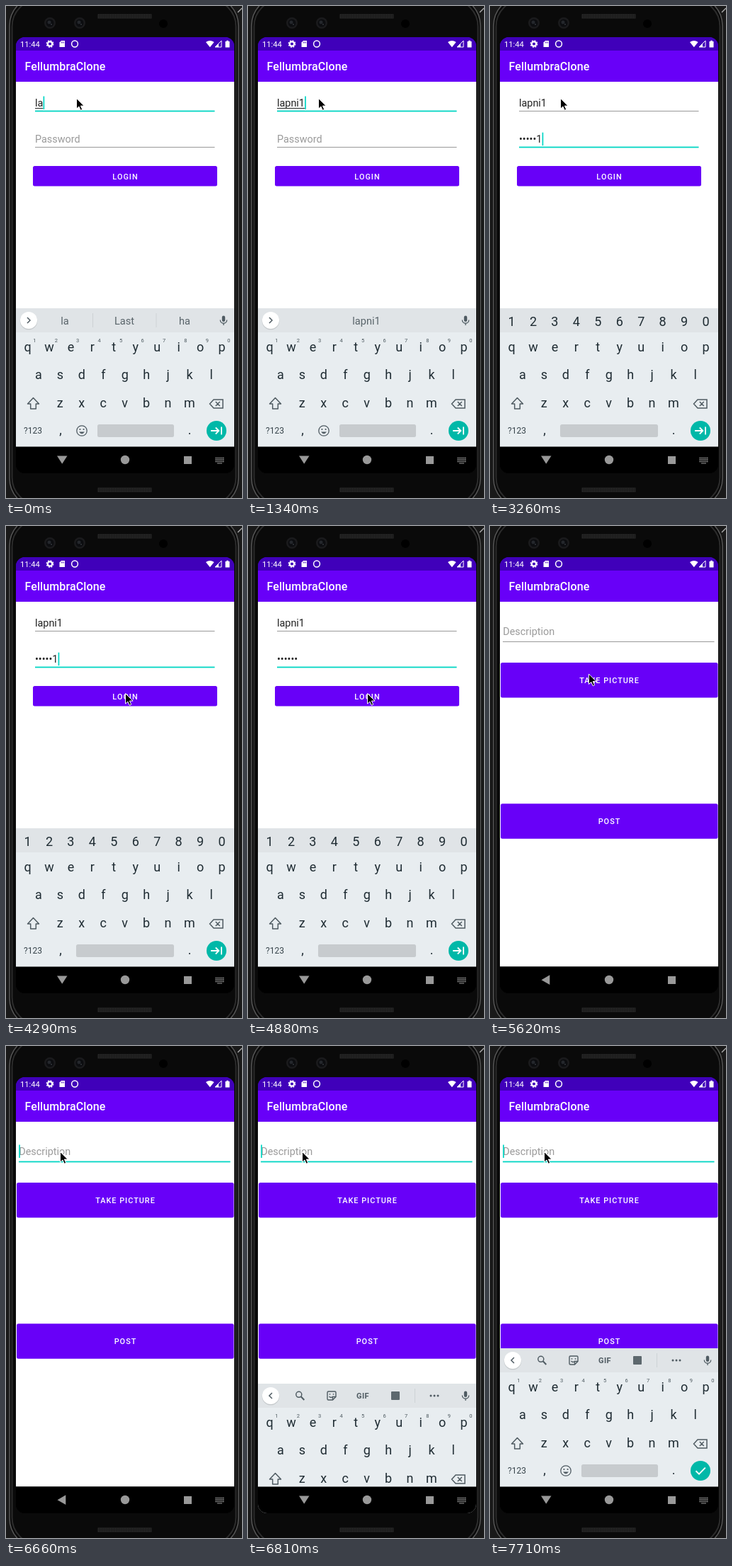
These frames come from a looping animation (333 by 695 pixels, 8000 ms). An HTML page:

```html
<!DOCTYPE html>
<html lang="en">
<head>
<meta charset="utf-8">
<title>Phone login</title>
<style>
  html, body { margin: 0; width: 100%; height: 100%; overflow: hidden; background: #161616; }
  svg { display: block; width: 333px; height: 695px; font-family: Roboto, "Open Sans", sans-serif; }
  text { white-space: pre; }
  .mid { text-anchor: middle; }
  .field { font-size: 14.4px; fill: #222; }
  .hint { font-size: 14.4px; fill: #9a9a9a; }
  .caps { font-size: 10.9px; font-weight: 500; letter-spacing: 1px; fill: #fff; text-anchor: middle; }
  .key { font-size: 18px; fill: #1f2c33; text-anchor: middle; }
  .sup { font-size: 7.5px; fill: #4c585e; text-anchor: middle; }
  .sug { font-size: 14.6px; fill: #59646a; text-anchor: middle; }
  .line { fill: none; stroke: #4f5b62; stroke-width: 1.5; }
</style>
</head>
<body>
<svg id="stage" viewBox="0 0 333 695"></svg>
<script>
const LOOP = 8000, STEP = 148.15;
const PURPLE = '#6800f8', DARK = '#4000ba', TEAL = '#00d5c4', GREY = '#999';
const PITCH = 30.45;

const rect = (x, y, w, h, fill, extra = '') =>
  `<rect x="${x}" y="${y}" width="${w}" height="${h}" fill="${fill}" ${extra}/>`;
const circle = (x, y, r, fill, extra = '') =>
  `<circle cx="${x}" cy="${y}" r="${r}" fill="${fill}" ${extra}/>`;
const path = (d, extra) => `<path d="${d}" ${extra}/>`;
const text = (x, y, s, cls, extra = '') =>
  `<text x="${x}" y="${y}" class="${cls}" ${extra}>${s}</text>`;
const group = (id, body, extra = '') => `<g id="${id}" ${extra}>${body}</g>`;
const row = (chars, x, y, cls) =>
  [...chars].map((c, i) => text(x + i * PITCH, y, c, cls)).join('');
const title = text(26.5, 91, 'FellumbraClone', '',
  'font-size="16" font-weight="500" letter-spacing=".1" fill="#fff"');

function speaker(y) {
  const dots = [1.5, 3.5, 5.5].map(d =>
    path(`M130 ${y + d}H205`, 'stroke="#343434" stroke-width="1" stroke-dasharray="1.2 1.2"')).join('');
  return rect(129, y, 77, 7, '#191919', 'rx="1.5"') + dots;
}

function phone() {
  const lens = x => circle(x, 24, 8, '#1b1b1d') + circle(x, 24, 5.5, '#0c0d10') +
    circle(x - 1, 23, 2.5, '#24272c') + circle(x + 2, 26, 1, '#33373d');
  return rect(0, 0, 333, 695, '#191919') +
    rect(5, -14, 323, 723, '#090909', 'rx="42" stroke="#565656" stroke-width="1.5"') +
    rect(8.5, -9, 316, 713, '#0a0a0a', 'rx="38" stroke="#2c2c2c" stroke-width="2"') +
    speaker(11) + speaker(680) + lens(62) + lens(104) +
    circle(222, 25, 6, '#000') +
    path('M327 9L333 3', 'stroke="#aaa" stroke-width="1.5"');
}

function statusBar() {
  const gear = circle(62, 53.5, 3.2, 'none', 'stroke="#fff" stroke-width="2.2"') +
    circle(62, 53.5, 4.7, 'none', 'stroke="#fff" stroke-width="1.4" stroke-dasharray="2 1.69"');
  return rect(14, 44, 308, 19, DARK) +
    text(20, 57.7, '11:44', '', 'font-size="11.2" fill="#fff"') + gear +
    path('M78 49H83V58H75.5V51.5Z', 'fill="#fff"') +
    path('M78.2 50.5V52.5M79.8 50.5V52.5M81.4 50.5V52.5', `stroke="${DARK}" stroke-width=".8"`) +
    circle(97, 53.5, 4.4, 'none', 'stroke="#fff" stroke-width="1.5"') +
    path('M282 51Q287.8 46.8 293.6 51L287.8 58.3Z', 'fill="#fff"') +
    path('M304 49V58H295Z', 'fill="none" stroke="#fff"') +
    path('M300 53.5V58H295Z', 'fill="#fff"') +
    path('M309.5 50H311.2V48.8H313.8V50H315.5V58.5H309.5Z', 'fill="#fff"');
}

const header = rect(14, 44, 308, 19, DARK) + rect(14, 63, 308, 44, PURPLE) + title;

function loginPage() {
  return rect(14, 63, 308, 560, '#fff') + header +
    text(41, 142, '', 'field', 'id="user"') + rect(41, 144, 0, 1, '#222', 'id="compose"') +
    rect(41, 0, 253.5, 1, GREY, 'id="userLine"') +
    text(41, 193, 'Password', 'hint', 'id="passHint"') +
    text(41, 193, '', 'field', 'id="pass"') +
    rect(41, 0, 253.5, 1, GREY, 'id="passLine"') +
    rect(0, 127.5, 1.7, 18.5, TEAL, 'id="caret"') +
    rect(39, 230, 258, 30, '#000', 'id="shade" rx="4" opacity=".2" filter="url(#soft)"') +
    rect(38, 226, 260, 28.5, PURPLE, 'rx="2.5"') +
    rect(38, 226, 260, 28.5, '#fff', 'rx="2.5" id="ripple"') +
    text(168.5, 244.5, 'LOGIN', 'caps');
}

function postPage() {
  const button = (y, label) => rect(15, y, 306.5, 49.5, PURPLE, 'rx="2.5"') +
    text(168.5, y + 28.8, label, 'caps');
  return rect(14, 63, 308, 560, '#fff') + header +
    text(18.3, 154, 'Description', 'hint') +
    rect(18, 0, 298.5, 1, GREY, 'id="descLine"') +
    rect(18.2, 139.5, 1.7, 18.5, TEAL, 'id="descCaret"') +
    button(193, 'TAKE PICTURE') + button(392.3, 'POST');
}

function keyboard() {
  const disc = d => circle(32, 445, 12.3, '#000', 'opacity=".12"') + circle(32, 444, 12, '#fff') +
    path(d, 'class="line" stroke-width="1.8"');
  const mic = rect(304.8, 437.5, 4.4, 8.5, '#4f5b62', 'rx="2.2"') +
    path('M302.3 443.5A4.7 4.7 0 0 0 311.7 443.5M307 448.3V451', 'class="line" style="stroke-width:1.3"');
  const words = disc('M30 440L34 444L30 448') + mic +
    group('bars', rect(122, 434, 1, 20, '#cdd2d5') + rect(211.5, 434, 1, 20, '#cdd2d5')) +
    [83, 167, 252].map((x, i) => text(x, 450, '', 'sug', `id="word${i}"`)).join('');
  const tools = disc('M34 440L30 444L34 448') + mic +
    circle(71.8, 442.3, 4, 'none', 'class="line"') + path('M74.8 445.3L79.3 450', 'class="line" style="stroke-width:2"') +
    path('M113.5 438H122.5Q124 438 124 439.5V445.5L119.5 450H113.5Q112 450 112 448.5V439.5Q112 438 113.5 438ZM124 445.5H119.5V450M114.5 445Q117 448 120 445', 'class="line" style="stroke-width:1.4"') +
    circle(115.5, 441.8, .9, '#4f5b62') + circle(120.5, 441.8, .9, '#4f5b62') +
    text(162, 448, 'GIF', 'mid', 'font-size="11" font-weight="700" letter-spacing=".4" fill="#4f5b62"') +
    rect(202, 438, 12, 12, '#5d686e', 'rx="1"') +
    rect(235, 434, 1, 20, '#cdd2d5') +
    [258, 263, 268].map(x => circle(x, 444, 1.5, '#4f5b62')).join('');
  const smile = circle(107, 600, 7.2, 'none', 'class="line" style="stroke-width:1.3"') +
    circle(104.4, 598, 1.1, '#4f5b62') + circle(109.6, 598, 1.1, '#4f5b62') +
    path('M103 601.5Q107 607 111 601.5Z', 'fill="#4f5b62"');
  return group('kbBack', rect(14, 427, 308, 196, '#e8edf0') + rect(14, 427, 308, 34, '#e0e4e7')) +
    group('words', words) + group('tools', tools) +
    group('digits', row('1234567890', 30.5, 451.5, 'key')) +
    row('qwertyuiop', 30.5, 487.5, 'key') +
    group('sups', row('1234567890', 40.3, 475, 'sup')) +
    row('asdfghjkl', 46, 527, 'key') + row('zxcvbnm', 76.3, 567, 'key') +
    path('M38.5 553.5L46.5 562H42.3V569H34.7V562H30.5Z', 'class="line" stroke-linejoin="round"') +
    path('M293 556H306V568H293L287.5 562ZM295.8 559L301.8 565M301.8 559L295.8 565', 'class="line"') +
    text(38, 604, '?123', 'mid', 'font-size="12" fill="#37444b"') +
    text(77, 605, ',', 'key') + text(259, 605, '.', 'key') + group('smile', smile) +
    rect(129, 591, 108, 18, '#c7cbce', 'rx="2.5" id="space"') +
    circle(297, 600, 14, '#00b8a8') +
    path('M289 600H300M295.8 595.5L300.3 600L295.8 604.5M304 594.5V605.5', 'id="next" fill="none" stroke="#fff" stroke-width="1.8"') +
    path('M290.5 600.3L295 604.6L303.8 595.6', 'id="done" fill="none" stroke="#fff" stroke-width="1.9"');
}

function navBar() {
  const keys = [638.5, 641, 643.5].map(y =>
    path(`M295.5 ${y}H307.5`, `stroke="${GREY}" stroke-width="1.4" stroke-dasharray="1.5 .6"`)).join('') +
    path('M298 646H305', `stroke="${GREY}" stroke-width="1.2"`);
  return path('M72 635.5H86.5L79.2 646.8Z', `id="navDown" fill="${GREY}"`) +
    path('M84.3 634.3V648L72.5 641.2Z', `id="navBack" fill="${GREY}"`) +
    circle(168, 641, 6.2, GREY) + rect(251, 636, 11, 11, GREY) + group('navKeys', keys);
}

const stage = document.getElementById('stage');
stage.innerHTML = `<defs>
  <clipPath id="screen"><rect x="14" y="44" width="308" height="616" rx="13"/></clipPath>
  <filter id="soft" x="-10%" y="-40%" width="120%" height="180%"><feGaussianBlur stdDeviation="1.8"/></filter>
  </defs>` + phone() +
  group('view', rect(14, 44, 308, 616, '#000') + statusBar() +
    group('login', loginPage()) + group('post', postPage()) +
    rect(14, 622.5, 308, 38, '#000', 'id="navBase"') +
    group('board', keyboard()) +
    rect(14, 622.5, 308, 38, '#000', 'id="navCover"') +
    group('edges', rect(14, 96, 1.5, 538, '#c4c4c4') + rect(320.5, 96, 1.5, 538, '#c4c4c4')) +
    group('status', statusBar()) + navBar(), 'clip-path="url(#screen)"') +
  path('M0 0V14.6L3.4 11.5L5.8 16.8L8.2 15.7L5.9 10.6H10.6Z',
    'id="mouse" fill="#000" stroke="#fff" stroke-width="1" stroke-linejoin="round"');

const $ = Object.fromEntries([...stage.querySelectorAll('[id]')].map(e => [e.id, e]));
const show = (el, on) => el.style.display = on ? '' : 'none';
const set = (el, attrs) => Object.entries(attrs).forEach(([k, v]) => el.setAttribute(k, v));
const put = (el, s) => { if (el.textContent !== s) el.textContent = s; };
const ease = p => { p = Math.max(0, Math.min(1, p)); return p * p * (3 - 2 * p); };
const latest = (list, s) => list.filter(e => e[0] <= s).pop();
const underline = (el, y, on) =>
  set(el, { y: on ? y - .7 : y - .3, height: on ? 1.8 : 1, fill: on ? TEAL : GREY });

const NAME = 'lapni1';
// [step, letters typed, suggestions]
const TYPED = [
  [0, 2, ['la', 'Last', 'ha']],
  [1, 3, ['lap', 'Lap', 'lapse']],
  [2, 4, ['lapn', 'Lawn', 'lain']],
  [4, 5, ['lapni', 'Lapin', 'lain']],
  [9, 6, ['', NAME, '']]
];
const SECRET = [[0, 0], [14, 1], [15, 3], [16, 4], [18, 5], [22, 6]];

function drawLogin(s) {
  const onPass = s >= 11;
  const [, count, words] = latest(TYPED, s);
  put($.user, NAME.slice(0, count));
  words.forEach((w, i) => put($['word' + i], w));
  show($.bars, s < 9);

  const n = latest(SECRET, s)[1];
  const masked = s >= 32 ? n : n - 1;
  put($.pass, n ? '•'.repeat(masked) + NAME.slice(masked, n) : '');
  show($.passHint, !n);

  const userEnd = $.user.getComputedTextLength();
  set($.compose, { width: userEnd });
  show($.compose, !onPass);
  underline($.userLine, 148.3, !onPass);
  underline($.passLine, 199.3, onPass);
  set($.caret, onPass
    ? { x: 41.2 + (n ? $.pass.getComputedTextLength() : 0), y: 178.7 }
    : { x: 41.2 + userEnd, y: 127.5 });
  const off = (s >= 7 && s < 9) || (s >= 26 && s < 29) || s >= 32;
  show($.caret, !off);

  const pressed = s === 30 || s === 31;
  show($.shade, pressed);
  set($.ripple, { opacity: pressed ? .2 : s === 32 ? .08 : 0 });
}

function drawPost(s) {
  const focus = s >= 44;
  underline($.descLine, 163.3, focus);
  show($.descCaret, focus && !(s >= 48 && s < 52));
  set($.post, { transform: s === 34 ? 'translate(168 352) scale(.99) translate(-168 -352)' : '' });
}

function drawBoard(s) {
  const ghost = s === 34, late = s >= 46;
  const numeric = s >= 11 && !late;
  show($.board, s <= 34 || late);
  show($.kbBack, !ghost);
  show($.words, s < 11);
  show($.tools, late);
  show($.digits, numeric);
  show($.sups, !numeric);
  show($.smile, !numeric);
  show($.next, !late);
  show($.done, late);
  set($.space, { x: numeric ? 99 : 129, width: numeric ? 138 : 108 });
  set($.board, {
    opacity: ghost ? .08 : 1,
    transform: ghost ? 'translate(168 398) scale(1.047) translate(-168 -352)'
      : s === 46 ? 'translate(0 50)' : ''
  });
}

function drawNav(s) {
  const down = s < 34 || s >= 46;
  show($.navDown, down);
  show($.navBack, !down);
  show($.navKeys, down || s === 45);
  set($.navBase, { y: s === 34 ? 619.6 : 622.5, height: 42 });
  show($.navCover, s !== 34);
  show($.edges, s === 34);
}

function drawMouse(s) {
  const a = ease((s - 23) / 6), b = ease((s - 35) / 8);
  const x = 99.5 + 69 * a - 92 * b, y = 130.5 + 106 * a - 87 * b;
  set($.mouse, { transform: `translate(${x} ${y})` });
}

function draw(t) {
  const s = Math.floor((t + 15) / STEP);
  show($.login, s < 34);
  show($.post, s >= 34);
  if (s < 34) drawLogin(s); else drawPost(s);
  drawBoard(s);
  drawNav(s);
  drawMouse(s);
}

const start = performance.now();
function tick() {
  draw((performance.now() - start) % LOOP);
  requestAnimationFrame(tick);
}
tick();
</script>
</body>
</html>
```
